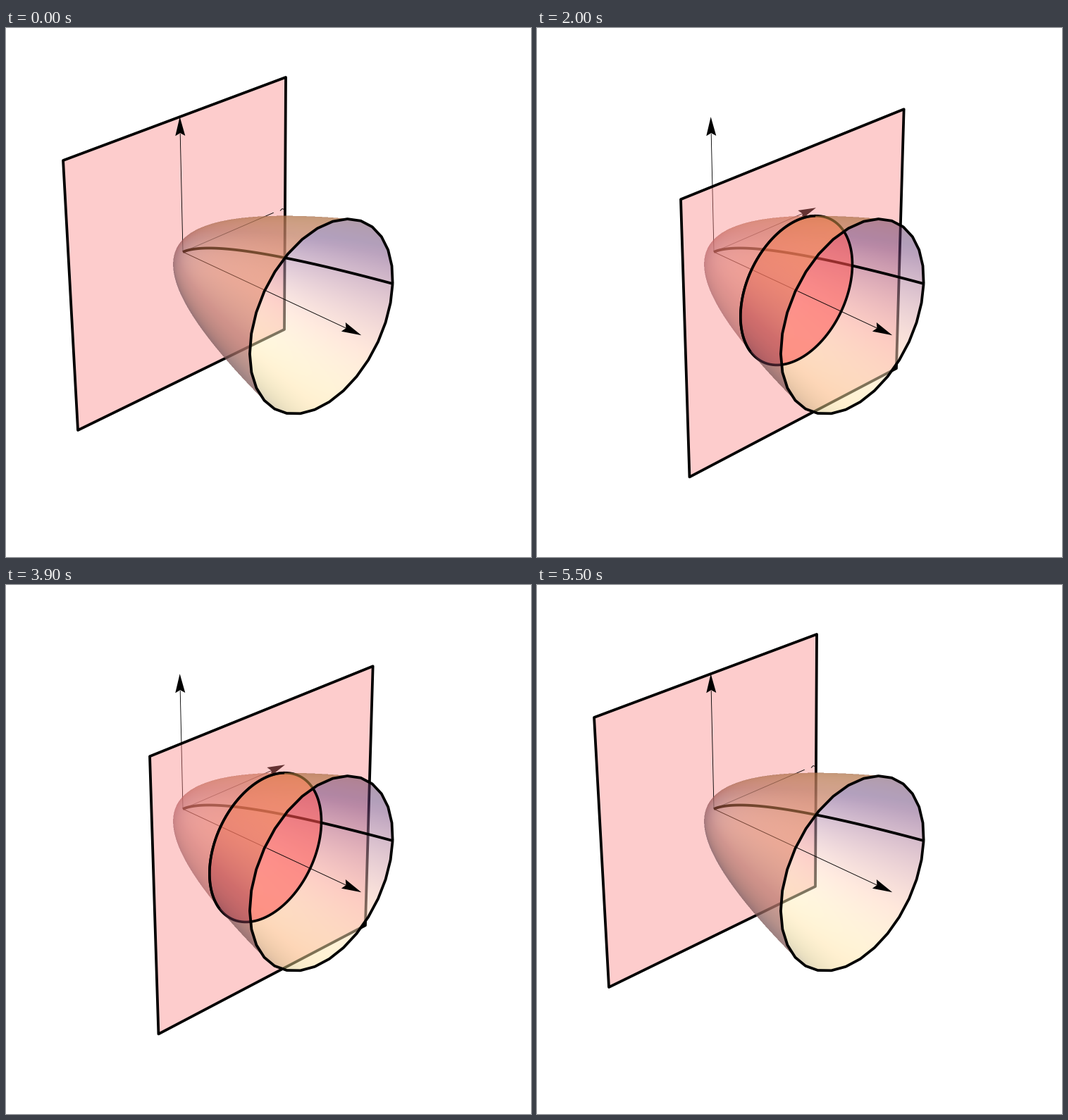
These frames come from a looping animation (745x751 px, 6 s). A matplotlib script:

```python
import numpy as np
import matplotlib.pyplot as plt
from matplotlib.animation import FuncAnimation
from matplotlib.patches import Polygon

W, H, DPI = 745, 751, 100
PX = 72 / DPI  # one pixel in points

# Perspective camera: screen = (M @ p + P0), divided by its last component
M = np.array([[86.61, 110.03, -8.97],
              [34.13, -34.27, -132.27],
              [-0.03157, 0.03133, -0.02447]])
P0 = np.array([253.6, 321.2, 1.0103])
M_INV = np.linalg.inv(M)
EYE = -M_INV @ P0

X_MAX = 2.0     # the bowl is y^2 + z^2 = x / 2 for 0 <= x <= X_MAX
HALF = 1.5      # half side of the cutting plane
ALPHA = 0.5     # opacity of the bowl
STEPS = 25

# Colour and view-space direction (right, up, towards viewer) of each light
AMBIENT = np.array([0.4, 0.2, 0.2])
LIGHTS = [((0, 0.18, 0.5), (1.5, -0.5, 2)),
          ((0.18, 0.5, 0.18), (1.5, 1.5, 3)),
          ((0.5, 0.18, 0), (-0.5, 1.5, 2)),
          ((0, 0, 0.18), (-0.5, -0.5, 2))]


def unit(v):
    return v / np.linalg.norm(v, axis=-1, keepdims=True)


def project(p):
    h = np.asarray(p, float) @ M.T + P0
    return h[..., :2] / h[..., 2:]


def ring(x, n):
    t = np.linspace(0, 2 * np.pi, n + 1)
    r = np.sqrt(x / 2)
    return np.column_stack([np.full(n + 1, x), r * np.cos(t), r * np.sin(t)])


def bowl_normal(p):
    return unit(np.stack([np.full(p.shape[:-1], -0.5),
                          2 * p[..., 1], 2 * p[..., 2]], axis=-1))


VIEW = unit(np.array([M[0] - W / 2 * M[2], H / 2 * M[2] - M[1], -M[2]]))


def shade(normal):
    n = normal @ VIEW.T
    rgb = np.zeros(n.shape) + AMBIENT
    for colour, direction in LIGHTS:
        lit = np.clip(n @ unit(np.array(direction, float)), 0, None)
        rgb += lit[..., None] * np.array(colour)
    return np.clip(rgb, 0, 1)


# Cast 2 x 2 rays per pixel over the box that holds the bowl
LEFT, RIGHT, TOP, BOTTOM = 230, 556, 258, 554
px, py = np.meshgrid(LEFT + (np.arange(2 * (RIGHT - LEFT)) + 0.5) / 2,
                     TOP + (np.arange(2 * (BOTTOM - TOP)) + 0.5) / 2)
rays = np.stack([px, py, np.ones_like(px)], axis=-1) @ M_INV.T
qa = rays[..., 1] ** 2 + rays[..., 2] ** 2
qb = 2 * (rays[..., 1:] @ EYE[1:]) - rays[..., 0] / 2
qc = EYE[1] ** 2 + EYE[2] ** 2 - EYE[0] / 2
disc = qb ** 2 - 4 * qa * qc
root = np.sqrt(np.clip(disc, 0, None))


def wall(sign):
    """Depth along x, hit mask and colour of the near (-1) or far (1) wall."""
    t = (-qb + sign * root) / (2 * qa)
    p = EYE + t[..., None] * rays
    hit = (disc >= 0) & (p[..., 0] <= X_MAX)
    return p[..., 0], hit, shade(-sign * bowl_normal(p))


NEAR, FAR = wall(-1), wall(1)


def pool(a):
    return (a[::2, ::2] + a[1::2, ::2] + a[::2, 1::2] + a[1::2, 1::2]) / 4


def wall_image(side, cut, front):
    x, hit, rgb = side
    cover = (hit & ((x > cut) == front)).astype(float)
    weight = pool(cover)
    colour = pool(rgb * cover[..., None]) / np.maximum(weight, 1e-9)[..., None]
    return np.dstack([np.clip(colour, 0, 1), ALPHA * weight])


fig = plt.figure(figsize=(W / DPI, H / DPI), dpi=DPI, facecolor="white")
ax = fig.add_axes([0, 0, 1, 1])


def new_line(width, z):
    return ax.plot([], [], color="black", lw=width * PX, zorder=z,
                   solid_joinstyle="round", solid_capstyle="butt")[0]


def new_layer(side, front, z):
    im = ax.imshow(wall_image(side, 0, front), zorder=z, aspect="auto",
                   extent=(LEFT, RIGHT, BOTTOM, TOP), interpolation="nearest")
    return im, side, front


def arrow_head(start, tip, length, half):
    a, b = project([start, tip])
    d = unit(b - a)
    side = half * np.array([-d[1], d[0]])
    base = b - length * d
    pts = [b, base + side, base + 4 * d, base - side]
    return ax.add_patch(Polygon(pts, fc="black", ec="none"))


def set_line(line, pts):
    line.set_data(*project(pts).T)


# Painter's order: axes, part behind the plane, plane, part in front, rim
layers = [new_layer(FAR, False, 1), new_layer(NEAR, False, 3),
          new_layer(FAR, True, 5), new_layer(NEAR, True, 7)]
sheet = ax.add_patch(Polygon(np.zeros((4, 2)), fc=(0.985, 0.5, 0.5, 0.4),
                             ec="none", zorder=4))
disk = ax.add_patch(Polygon(np.zeros((4, 2)), fc=(1, 0.15, 0.13, 0.32),
                            ec="none", zorder=4.1))
border = ax.add_patch(Polygon(np.zeros((4, 2)), fc="none", ec="black",
                              lw=3.8 * PX, joinstyle="round", zorder=4.2))
curve_back, curve_front = new_line(3.8, 2), new_line(3.8, 6)
axis_back, axis_front = new_line(0.9, 2), new_line(0.9, 6)
section_far, section_near = new_line(3.6, 5.5), new_line(3.6, 8)
rim = new_line(3.8, 9)
set_line(rim, ring(X_MAX, 30))

ORIGIN = (0, 0, 0)
Y_TIP, Z_TIP, X_TIP = (0, HALF, 0), (0, 0, HALF), (2.495, 0, 0)
y_axis, y_tick, z_axis = (new_line(0.9, 0) for _ in range(3))
y_head = arrow_head(ORIGIN, Y_TIP, 25, 6.7)
z_head = arrow_head(ORIGIN, Z_TIP, 27, 7)
arrow_head(ORIGIN, X_TIP, 28, 7).set_zorder(8.5)
set_line(z_axis, [ORIGIN, (0, 0, 1.32)])
y_tick.set_data([389, 392, 394.5], [259.5, 256.5, 257.5])

ax.set_xlim(0, W)
ax.set_ylim(H, 0)
ax.axis("off")


def step_at(i):
    if i < 30:
        return max(0, min(STEPS, i - 4))
    return max(0, STEPS - max(0, i - 30))


def plane_x(step):
    return 0.008 + 0.0811 * (step - 1) if step else 0.0


def curve(x0, x1):
    r = np.linspace(np.sqrt(x0 / 2), np.sqrt(x1 / 2), 60)
    return np.column_stack([2 * r ** 2, r, 0 * r])


def draw(i):
    cut = plane_x(step_at(i))
    flush = cut == 0  # the plane holds the y and z axes
    for im, side, front in layers:
        im.set_data(wall_image(side, cut, front))

    corners = project([(cut, y, z) for y, z in
                       ((-HALF, -HALF), (HALF, -HALF), (HALF, HALF), (-HALF, HALF))])
    sheet.set_xy(corners)
    border.set_xy(corners)

    loop = ring(cut, 120)
    facing = np.sum(bowl_normal(loop) * (EYE - loop), axis=1) > 0
    disk.set_xy(project(loop))
    set_line(section_far, loop)
    set_line(section_near, np.where(facing[:, None], loop, np.nan))
    for part in (disk, section_far, section_near):
        part.set_visible(not flush)

    set_line(curve_back, curve(0, cut))
    set_line(curve_front, curve(cut, X_MAX))
    set_line(axis_back, [ORIGIN, (cut, 0, 0)])
    set_line(axis_front, [(cut, 0, 0), (2.35, 0, 0)])

    set_line(y_axis, [ORIGIN, (0, 1.325, 0)])
    y_head.set_visible(not flush)
    y_tick.set_visible(flush)
    for part in (y_axis, y_tick, z_axis, y_head, z_head):
        part.set_zorder(4.5 if flush else 0)
    return []


anim = FuncAnimation(fig, draw, frames=60, interval=100, repeat=True,
                     repeat_delay=0, blit=False)
plt.show()
```
